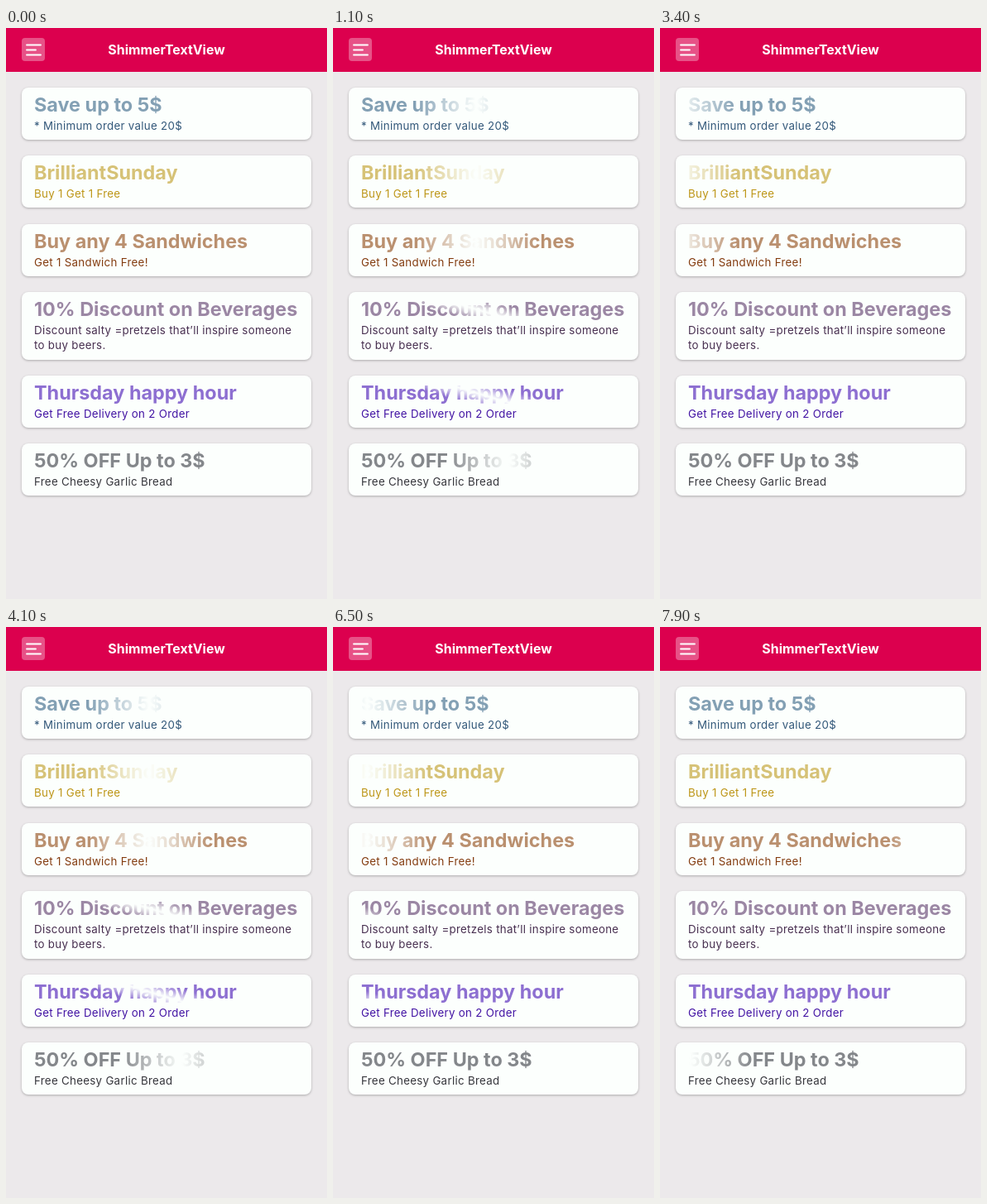
Write an HTML page that moves like this. It is 388 by 690 pixels and loops after 8 s.

```html
<!DOCTYPE html>
<html lang="en">
<head>
<meta charset="utf-8">
<title>ShimmerTextView</title>
<style>
  html, body { margin: 0; width: 100%; height: 100%; overflow: hidden; }
  body { position: relative; background: #ece9eb; font-family: Inter, "Open Sans", sans-serif; }
  header {
    position: absolute; left: 0; top: 0; width: 388px; height: 52.5px;
    background: #dc004e; color: #fff; text-align: center;
    font-size: 15.9px; font-weight: 700; line-height: 53px;
  }
  header svg { position: absolute; left: 19px; top: 12px; }
  .card {
    position: absolute; left: 19px; width: 350px; height: 63px;
    border-radius: 8px; background: #fcfffd; box-shadow: 0 1px 3px #0004;
  }
  h2, p { position: absolute; left: 15px; width: 318px; margin: 0; white-space: pre; }
  h2 { top: 5.5px; font-size: 23.4px; font-weight: 700; line-height: 30px; }
  p { top: 36.7px; font-size: 13.3px; font-weight: 400; line-height: 18.5px; letter-spacing: .3px; }
</style>
</head>
<body>
<header>
  <svg width="28" height="28">
    <rect width="28" height="28" rx="4" fill="#fff" opacity=".32"/>
    <path d="M6 8.5h17M6 14.5h11M6 20.5h17" stroke="#fff" stroke-width="1.8" stroke-linecap="round"/>
  </svg>
  ShimmerTextView
</header>
<script>
  const PERIOD = 3000, MIDDLE = 194;
  const right = { angle: 90, speed: .22, spread: 74 };
  const left = { angle: 270, speed: .22, spread: 74 };
  const slant = { angle: 16.6, speed: .3, spread: 52 };

  // top, heading, heading colour, details, details colour, sweep
  const offers = [
    [72, 'Save up to 5$', '#83a0b4', '* Minimum order value 20$', '#33587a', right],
    [154, 'BrilliantSunday', '#d6c277', 'Buy 1 Get 1 Free', '#bd9618', right],
    [237, 'Buy any 4 Sandwiches', '#ba906f', 'Get 1 Sandwich Free!', '#843c10', right],
    [319, '10% Discount on Beverages', '#9b87a4',
      'Discount salty =pretzels that’ll inspire someone\nto buy beers.', '#482f50', slant],
    [420, 'Thursday happy hour', '#8d6fd1', 'Get Free Delivery on 2 Order', '#4314a4', slant],
    [502, '50% OFF Up to 3$', '#84878b', 'Free Cheesy Garlic Bread', '#36363c', left],
  ];

  function addText(parent, tag, text, color) {
    const node = parent.appendChild(document.createElement(tag));
    node.textContent = text;
    node.style.color = color;
    return node;
  }

  const shimmers = offers.map(([top, title, titleColor, details, detailsColor, sweep]) => {
    const card = document.body.appendChild(document.createElement('div'));
    card.className = 'card';
    card.style.top = top + 'px';
    if (details.includes('\n')) card.style.height = '82px';
    const heading = addText(card, 'h2', title, titleColor);
    addText(card, 'p', details, detailsColor);
    return { heading, sweep };
  });

  // The sweep is measured along x, then projected on the gradient direction.
  function sweepMask({ angle, speed, spread }, t) {
    const scale = Math.abs(Math.sin(angle * Math.PI / 180));
    const center = 174 + speed * (t - 1100) - MIDDLE;
    const stop = (color, dx) => `${color} calc(50% + ${((center + dx) * scale).toFixed(2)}px)`;
    return `linear-gradient(${angle}deg, ${stop('#000', -spread)}, ${stop('#0000', 0)}, ${stop('#000', spread)})`;
  }

  const start = performance.now();
  function draw() {
    const t = (performance.now() - start) % 8000 % PERIOD;
    for (const { heading, sweep } of shimmers) {
      const mask = sweepMask(sweep, t);
      heading.style.webkitMaskImage = mask;
      heading.style.maskImage = mask;
    }
    requestAnimationFrame(draw);
  }
  draw();
</script>
</body>
</html>
```
